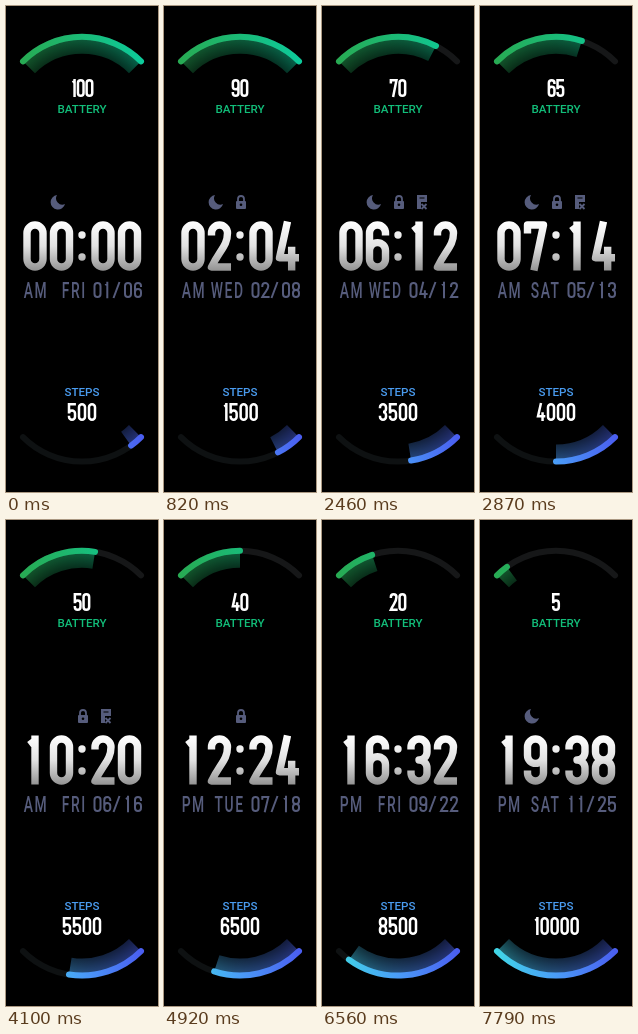
Write an HTML page that moves like this. It is 152 px wide and 486 px high and loops after 8200 ms.

```html
<!DOCTYPE html>
<html lang="en">
<head>
<meta charset="utf-8">
<title>Watch face</title>
<style>
  html, body { margin: 0; width: 100%; height: 100%; overflow: hidden; background: #000; }
  svg { display: block; width: 152px; height: 486px; }
  path { fill: none; }
  text { font-family: Roboto, "Open Sans", sans-serif; font-weight: 500; }
  .track, .bar { stroke-width: 6; stroke-linecap: round; }
  .track { stroke: #161718; }
  #steps .track { stroke: #0e1112; }
  .glow { stroke-width: 15; }
  .label { font-size: 11.6px; text-anchor: middle; }
  .count { stroke: #fff; stroke-width: 2.5; }
  .date { stroke: #565c7c; stroke-width: 2; }
  .words { fill: #565c7c; font-size: 22.4px; letter-spacing: 2.5px; }
  .icon { fill: #565c7c; }
  .line { stroke: #565c7c; stroke-width: 1.8; }
</style>
</head>
<body>
<svg viewBox="0 0 152 486">
  <defs>
    <linearGradient id="green" gradientUnits="userSpaceOnUse" x1="14" x2="138" y1="0" y2="0">
      <stop stop-color="#28aa52"/><stop offset="1" stop-color="#0ccb9c"/>
    </linearGradient>
    <linearGradient id="blue" gradientUnits="userSpaceOnUse" x1="14" x2="138" y1="0" y2="0">
      <stop stop-color="#4a5cf0"/><stop offset=".5" stop-color="#4a9cf8"/><stop offset="1" stop-color="#40d8e6"/>
    </linearGradient>
    <linearGradient id="silver" gradientUnits="userSpaceOnUse" x1="0" x2="0" y1="215" y2="265">
      <stop stop-color="#fff"/><stop offset=".5" stop-color="#e2e2e2"/><stop offset="1" stop-color="#929292"/>
    </linearGradient>
    <radialGradient id="fade" gradientUnits="userSpaceOnUse" cx="76" cy="114.3" r="82">
      <stop offset=".8" stop-color="#fff" stop-opacity=".24"/><stop offset="1" stop-color="#fff" stop-opacity=".5"/>
    </radialGradient>
    <mask id="soft" maskUnits="userSpaceOnUse" x="0" y="0" width="152" height="120">
      <rect width="152" height="120" fill="url(#fade)"/>
    </mask>
  </defs>

  <g id="battery" stroke="url(#green)"></g>
  <g id="steps" stroke="url(#blue)" transform="rotate(180 76 243.2)"></g>

  <path id="batteryCount" class="count"/>
  <text class="label" x="76" y="107" fill="#12be7a">BATTERY</text>
  <text class="label" x="76" y="390" fill="#4a9cf0">STEPS</text>
  <path id="stepCount" class="count"/>

  <g id="moon"><path class="icon" d="M51 189a7.3 7.3 0 1 0 8 9a6.3 6.3 0 0 1-8-9z"/></g>
  <g id="lock">
    <path class="line" d="M74 196v-3a3 3 0 0 1 6 0v3"/>
    <rect class="icon" x="72" y="195" width="10" height="8" rx="1"/>
    <circle cx="77" cy="198.7" r="1.3"/>
  </g>
  <g id="card">
    <path class="icon" d="M95 189h10v7h-6v7h-4z"/>
    <path stroke="#000" d="M97.500 192h5"/>
    <path class="line" d="M99.500 198l5 5m0-5l-5 5"/>
  </g>

  <path id="clock" stroke="url(#silver)" stroke-width="7.4" stroke-linejoin="round"/>
  <g fill="url(#silver)"><circle cx="76" cy="229" r="3.700"/><circle cx="76" cy="251" r="3.700"/></g>

  <g class="words" transform="translate(0 292) scale(.62 1)">
    <text id="half" x="28.500"/>
    <text id="weekday" x="130" text-anchor="end"/>
  </g>
  <path id="date" class="date"/>
</svg>
<script>
const $ = id => document.getElementById(id);
const STEP = 410, COUNT = 20;
const DAYS = ['SUN', 'MON', 'TUE', 'WED', 'THU', 'FRI', 'SAT'];

for (const id of ['battery', 'steps']) {
  const arc = 'd="M17 55.3A83.4 83.4 0 0 1 135 55.3" pathLength="10"';
  $(id).innerHTML = `<path class="track" ${arc}/>
    <g mask="url(#soft)"><path class="glow fill" d="M23.7 62A74 74 0 0 1 128.3 62" pathLength="10"/></g>
    <path class="bar fill" ${arc}/>`;
}

// Centre line of one condensed digit in the box x, y, w, h.
function digit(n, x, y, w, h) {
  const k = w / 2, r = x + w, b = y + h, m = y + h / 2;
  const over = w * .22, tip = w * .15;
  const turn = (dx, dy, sweep = 1) => `a${k} ${k} 0 0 ${sweep} ${dx} ${dy}`;
  const ring = (top, bottom) =>
    `M${x} ${top + k}${turn(w, 0)}V${bottom - k}${turn(-w, 0)}z`;
  switch (+n) {
    case 0: return ring(y, b);
    case 1: return `M${x + tip} ${y + h * .14}L${x + k} ${y + h * .04}M${x + k} ${y - over}V${b + over}`;
    case 2: return `M${x} ${y + k + tip}V${y + k}${turn(w, 0)}C${r} ${y + h * .5} ${x + k} ${y + h * .6} ${x} ${b}H${r + over}`;
    case 3: return `M${x} ${y + k + tip}V${y + k}${turn(w, 0)}V${m - k}${turn(-k, k)}${turn(k, k)}V${b - k}${turn(-w, 0)}v${-tip}`;
    case 4: return `M${x + k} ${y - over}L${x} ${y + h * .78}H${r + over}M${x + w * .76} ${y + h * .52}V${b + over}`;
    case 5: return `M${r + tip} ${y}H${x}V${y + h * .52}V${y + h * .4 + k}${turn(w, 0)}V${b - k}${turn(-w, 0)}v${-tip}`;
    case 6: return ring(y + h * .42, b) + `M${r} ${y + k + tip}V${y + k}${turn(-w, 0, 0)}V${b - k}`;
    case 7: return `M${x} ${y + h * .2}V${y}H${r}L${x + w * .4} ${b + over}`;
    case 8: return ring(y, m) + ring(m, b);
    case 9: return ring(y, y + h * .58) + `M${x} ${b - k - tip}V${b - k}${turn(w, 0, 0)}V${y + k}`;
  }
}

const cells = (text, xs, y, w, h) => xs.map((x, i) => digit(text[i], x, y, w, h)).join('');

function centred(value, y, w, pitch) {
  const chars = [...String(value)];
  const advance = c => c === '1' ? pitch - w * .45 : pitch;
  let x = 76 - (chars.reduce((sum, c) => sum + advance(c), 0) - pitch + w) / 2;
  return chars.map(c => {
    const d = digit(c, x, y, w, 15.4);
    x += advance(c);
    return d;
  }).join('');
}

function gauge(id, level) {
  for (const path of $(id).querySelectorAll('.fill'))
    path.setAttribute('stroke-dasharray', `${Math.min(10, level)} 20`);
}

const two = n => String(n).padStart(2, '0');
const draw = (id, d) => $(id).setAttribute('d', d);
const show = (id, on) => $(id).setAttribute('visibility', on ? 'visible' : 'hidden');

function render(i) {
  const battery = 100 - 5 * i, steps = 500 * (i + 1);
  const month = 1 + Math.ceil(i / 2), day = 6 + i;

  gauge('battery', Math.floor(battery / 10) + 1);
  gauge('steps', Math.floor(steps / 1000) + 1);
  draw('batteryCount', centred(battery, 74.3, 5.6, 8.7));
  draw('stepCount', centred(steps, 398.3, 6, 10));

  draw('clock', cells(two(i) + two(2 * i), [21, 47.5, 89, 115.5], 219, 16, 42));
  draw('date', cells(two(month) + two(day), [88.5, 98.3, 119, 129], 277, 6, 14) + 'M107.500 292L113.500 276');
  $('half').textContent = i < 12 ? 'AM' : 'PM';
  $('weekday').textContent = DAYS[new Date(2023, month - 1, day).getDay()];

  show('moon', i < 9 || i > 17);
  show('lock', i > 1 && i < 15);
  show('card', i > 2 && i < 12);
}

let start, last;
function tick(now) {
  start ??= now;
  const i = Math.floor((now - start) / STEP) % COUNT;
  if (i !== last) render(last = i);
  requestAnimationFrame(tick);
}
render(0);
requestAnimationFrame(tick);
</script>
</body>
</html>
```
